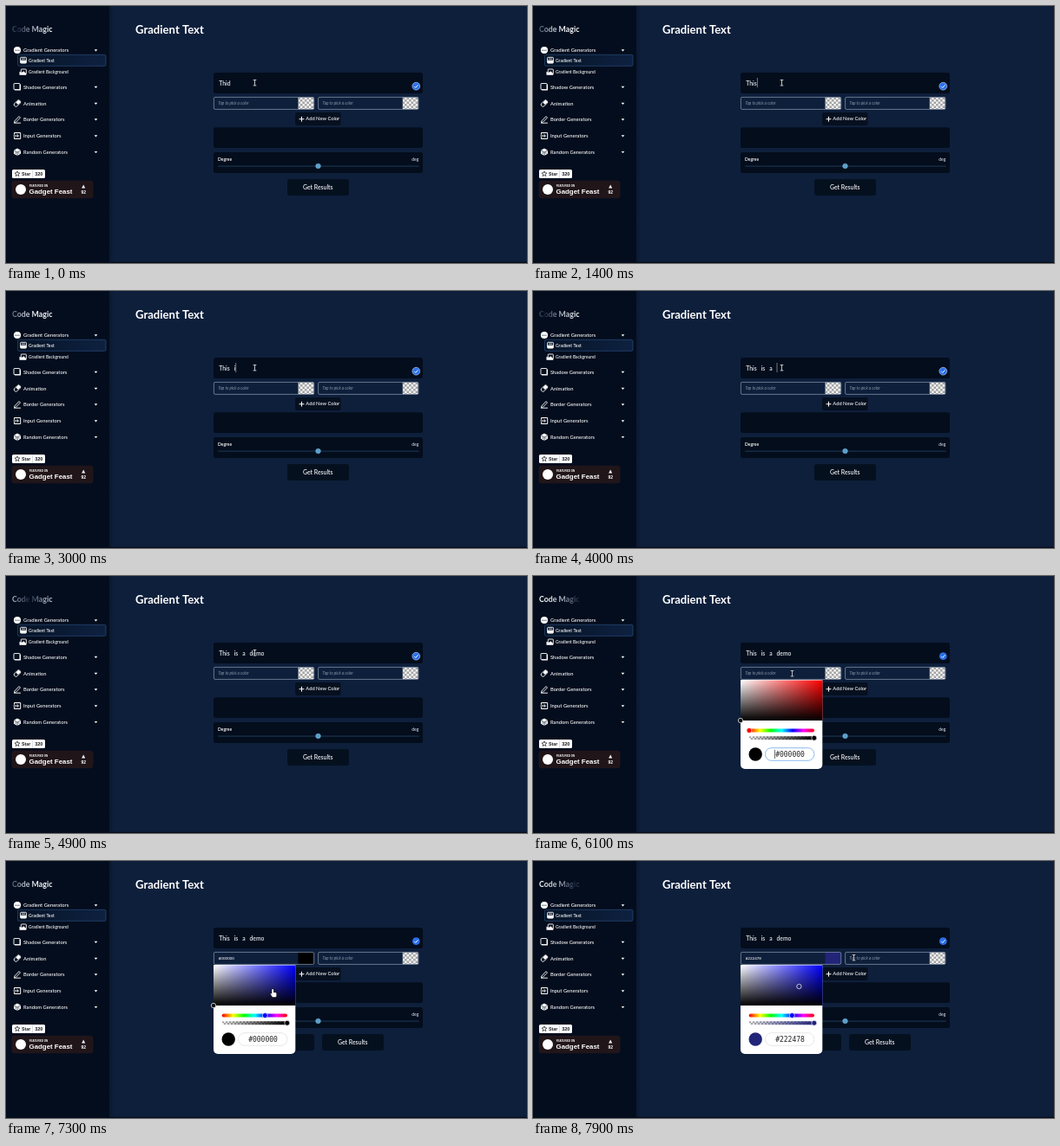
Animation of 600 by 297 pixels, one loop 8 s. Source, as an HTML page with a canvas:

```html
<!DOCTYPE html>
<html lang="en">
<head>
<meta charset="utf-8">
<title>Gradient Text</title>
<style>
html, body { margin: 0; width: 100%; height: 100%; overflow: hidden; background: #0e1f3b; }
canvas { display: block; width: 600px; height: 297px; }
</style>
</head>
<body>
<canvas id="stage"></canvas>
<script>
const W = 600, H = 297, LOOP = 8000, STEP = 100;
const canvas = document.getElementById('stage');
const c = canvas.getContext('2d');
const ratio = window.devicePixelRatio || 1;
canvas.width = W * ratio;
canvas.height = H * ratio;

const SANS = 'Lato, "Open Sans", sans-serif';
const ARIAL = '"Liberation Sans", Arial, sans-serif';
const MONO = '"DejaVu Sans Mono", monospace';
const WHITE = '#fff', PANEL = '#040d1c', BLUE = '#2a6fe8';

// Event times in ms
const TYPED = 4800, OPEN = 5900, HUE = 6700, PICK = 7500;

const typing = [
  [0, 'Thid'], [400, 'Thi'], [800, 'This'], [2300, 'This '], [2900, 'This i'],
  [3300, 'This is'], [3500, 'This is '], [3700, 'This is a'], [3900, 'This is a '],
  [4100, 'This is a d'], [4300, 'This is a de'], [4500, 'This is a dem'], [4700, 'This is a demo']
];
const pointer = [
  [0, 286, 89], [5300, 286, 89], [5700, 298, 113], [6200, 298, 113], [6600, 298, 179],
  [6900, 298, 179], [7300, 308, 153], [7400, 306, 146], [7600, 306, 146], [7900, 369, 112]
];
// Centre of the dark band that runs through the brand text
const shade = [[0, 13], [1400, 0], [3000, -2], [4900, 27], [6100, 53], [7300, 0], [7900, 49]];

function track(keys, t, col = 1) {
  const i = keys.findIndex(k => k[0] > t);
  if (i < 0) return keys[keys.length - 1][col];
  const a = keys[i - 1], b = keys[i];
  return a[col] + (b[col] - a[col]) * (t - a[0]) / (b[0] - a[0]);
}

function box(x, y, w, h, r, fill, line, lw = 0.7) {
  c.beginPath();
  c.roundRect(x, y, w, h, r);
  if (fill) { c.fillStyle = fill; c.fill(); }
  if (line) { c.strokeStyle = line; c.lineWidth = lw; c.stroke(); }
}

function dot(x, y, r, fill, line, lw = 0.8) {
  c.beginPath();
  c.arc(x, y, r, 0, Math.PI * 2);
  if (fill) { c.fillStyle = fill; c.fill(); }
  if (line) { c.strokeStyle = line; c.lineWidth = lw; c.stroke(); }
}

function path(pts, line, fill, lw = 1) {
  c.beginPath();
  for (let i = 0; i < pts.length; i += 2) c.lineTo(pts[i], pts[i + 1]);
  if (fill) { c.closePath(); c.fillStyle = fill; c.fill(); }
  if (line) { c.strokeStyle = line; c.lineWidth = lw; c.stroke(); }
}

function label(s, x, y, size, { weight = 500, color = WHITE, font = SANS, align = 'left', style = '' } = {}) {
  c.font = `${style} ${weight} ${size}px ${font}`;
  c.fillStyle = color;
  c.textAlign = align;
  c.fillText(s, x, y);
}

function ramp(x0, y0, x1, y1, colors) {
  const g = c.createLinearGradient(x0, y0, x1, y1);
  colors.forEach((k, i) => g.addColorStop(i / (colors.length - 1), k));
  return g;
}

function checker(x, y, w, h, s) {
  c.save();
  c.beginPath();
  c.rect(x, y, w, h);
  c.clip();
  c.fillStyle = '#f4f4f4';
  c.fillRect(x, y, w, h);
  c.fillStyle = '#a3a3a3';
  for (let j = 0; j * s < h; j++)
    for (let i = j % 2; i * s < w; i += 2) c.fillRect(x + i * s, y + j * s, s, s);
  c.restore();
}

function icon(kind, x, y) {
  c.save();
  c.translate(x, y);
  if (kind === 'globe') {
    dot(0, 0, 4.1, WHITE);
    [-2, 0, 2].forEach(i => dot(i, 0.2, 0.6, '#15233b'));
  } else if (kind === 'shadow') {
    box(-3, -3, 7, 7, 0.5, WHITE);
    box(-4, -4, 7, 7, 0.5, '#06101f', WHITE, 0.9);
  } else if (kind === 'motion') {
    c.rotate(-Math.PI / 4);
    box(-4.2, -2.1, 8.4, 4.2, 1.6, null, WHITE, 0.9);
    box(-0.5, -1.8, 4.4, 3.6, 1.2, WHITE);
  } else if (kind === 'pen') {
    path([-3.2, 2, 2, -3.5, 3.5, -2, -1.7, 3.3, -3.5, 3.5, -3.2, 2], WHITE, null, 0.9);
    path([-4, 4.2, 4, 4.2], WHITE, null, 0.9);
  } else if (kind === 'input') {
    path([-3.5, -1.3, -3.5, -3.5, 3.7, -3.5, 3.7, 3.5, -3.5, 3.5, -3.5, 1.3], WHITE);
    path([-4.5, 0, 1, 0], WHITE);
    path([-0.3, -1.7, 1.5, 0, -0.3, 1.7], WHITE);
  } else if (kind === 'dice') {
    path([0, -4.3, 4, -2, 4, 2, 0, 4.3, -4, 2, -4, -2], null, WHITE);
    path([-4, -2, 0, 0.4, 4, -2], '#0a1528', null, 0.7);
    path([0, 0.4, 0, 4.3], '#0a1528', null, 0.7);
    [-2, 2].forEach(i => dot(i, 1.2, 0.6, '#0a1528'));
  } else if (kind === 'text') {
    box(-3.4, -3.4, 6.8, 6.8, 0.8, null, WHITE, 0.9);
    box(-3.2, 0, 6.4, 3.2, 0, WHITE);
    path([-2, -1.5, 2, -1.5], WHITE, null, 0.8);
  } else if (kind === 'image') {
    box(-2.2, -3.3, 6, 5.6, 0.6, null, WHITE, 0.9);
    path([-4, 3.5, -4, -0.5, -1.5, 0.7, 0.8, -1, 3.8, 2, 3.8, 3.5], null, WHITE);
  }
  c.restore();
}

function sidebar(t) {
  c.fillStyle = ramp(119, 0, 124, 0, ['rgba(3,10,24,.3)', 'rgba(3,10,24,0)']);
  c.fillRect(119, 0, 5, H);
  c.fillStyle = '#040d1d';
  c.fillRect(0, 0, 119, H);

  const p = track(shade, t);
  label('Code Magic', 7, 30.3, 8.8, {
    weight: 700, color: ramp(p - 38, 0, p + 38, 0, ['#f4f6f9', '#a4adbc', '#17263f', '#a4adbc', '#f4f6f9'])
  });

  const menu = [
    ['globe', 'Gradient', 51], ['shadow', 'Shadow', 93.5], ['motion', '', 112.5],
    ['pen', 'Border', 131], ['input', 'Input', 150], ['dice', 'Random', 168.7]
  ];
  for (const [kind, name, y] of menu) {
    icon(kind, 13, y);
    label(name ? name + ' Generators' : 'Animation', 20, y + 2.2, 5.8);
    path([101.6, y - 0.8, 105.4, y - 0.8, 103.5, y + 1.4], null, WHITE);
  }
  box(13.5, 56.3, 101.5, 13, 1.5, ramp(13, 0, 115, 0, ['#071427', '#0d2140']), '#2f5587', 0.6);
  icon('text', 20, 62.7);
  label('Gradient Text', 26, 64.8, 5);
  icon('image', 19.5, 76.3);
  label('Gradient Background', 26, 78.3, 4.9);

  box(7, 189, 38, 10, 1.5, WHITE);
  c.fillStyle = '#c6cad0';
  c.fillRect(30, 189, 0.6, 10);
  const star = [];
  for (let i = 0; i < 11; i++) {
    const a = i * Math.PI / 5 - Math.PI / 2, r = i % 2 ? 1.4 : 3.1;
    star.push(13 + r * Math.cos(a), 194 + r * Math.sin(a));
  }
  path(star, '#15181d', null, 0.7);
  label('Star', 18, 196.2, 5.3, { weight: 700, color: '#15181d', font: ARIAL });
  label('320', 33.2, 196.2, 5.5, { weight: 700, color: '#15181d', font: ARIAL });

  box(7, 202.3, 93, 19.4, 2.5, '#201518', '#2c1d20', 0.6);
  dot(17, 212, 6, WHITE);
  label('FEATURED ON', 26.7, 208.8, 3, { weight: 700, font: ARIAL });
  label('Gadget Feast', 26.5, 217, 7.9, { weight: 700, font: ARIAL });
  path([87.2, 210.5, 91.2, 210.5, 89.2, 206.5], null, WHITE);
  label('92', 89.2, 217, 5, { weight: 700, font: ARIAL, align: 'center' });
}

function colorField(x, value) {
  if (value) {
    c.fillStyle = value;
    c.fillRect(x + 97, 105.5, 18, 13.8);
    label(value, x + 5.3, 114.3, 4.5);
  } else {
    checker(x + 97, 105.5, 18, 13.8, 2.5);
    label('Tap to pick a color', x + 5, 114.2, 4.7, { weight: 400, style: 'italic', color: '#8a97ab' });
  }
  box(x, 105.4, 115.3, 14, 1.5, null, '#a3b3c7', 0.6);
}

function form(t, color) {
  label('Gradient Text', 149, 32.4, 13.1, { weight: 700 });

  box(239, 77, 241, 24, 2.5, PANEL);
  const text = typing.filter(k => k[0] <= t).pop()[1];
  c.wordSpacing = '3.2px';
  label(text, 245.3, 91.8, 6.8, { weight: 600, color: '#e6e9ee' });
  const end = 245.3 + c.measureText(text).width;
  c.wordSpacing = '0px';
  if (t > 0 && t < TYPED) {
    c.fillStyle = '#b9c1cc';
    c.fillRect(end + 0.2, 83, 0.6, 11);
  }
  dot(472.3, 92.7, 4.4, BLUE, t < OPEN ? '#c9dcff' : null, 0.6);
  path([470.2, 92.9, 471.7, 94.4, 474.6, 91.2], WHITE, null, 0.9);

  colorField(239.4, color);
  colorField(359.6, null);

  box(333, 123, 52.5, 15, 2, '#06101f');
  path([337.6, 130.7, 343.4, 130.7], WHITE);
  path([340.5, 127.8, 340.5, 133.6], WHITE);
  label('Add New Color', 345.3, 132.4, 5.75);

  box(239, 140.3, 241, 23.7, 2.5, PANEL);
  box(239, 169, 241, 24, 2.5, PANEL);
  label('Degree', 244, 178.5, 5, { weight: 600 });
  label('deg', 475.3, 178.5, 5, { align: 'right', color: '#d5dbe4' });
  box(244, 184.2, 232, 1.8, 0.9, '#12283f');
  dot(359.5, 185, 2.8, '#5a9fcb', '#82bcdf', 0.5);

  if (color) box(284, 200, 71, 19, 2.5, '#05101f');
  const x = color ? 364 : 324;
  box(x, 200, 71, 19, 2.5, '#05101f');
  label('Get Results', x + 35.3, 212, 6.9, { align: 'center' });
}

function picker(t, color) {
  const picked = t >= PICK, hue = t >= HUE ? 240 : 0;
  const pure = `hsl(${hue} 100% 50%)`, shown = color || '#000000';
  box(239, 120, 94.3, 103, [0, 0, 5, 5], WHITE);
  for (const g of [ramp(239, 0, 333, 0, [WHITE, pure]), ramp(0, 120.5, 0, 167, ['rgba(0,0,0,0)', '#000'])]) {
    c.fillStyle = g;
    c.fillRect(239, 120.5, 94.3, 46.5);
  }
  dot(picked ? 306.4 : 239, picked ? 145 : 167, 2.7, shown, '#e8e8e8', 0.8);

  const rainbow = [0, 60, 120, 180, 240, 300, 360].map(h => `hsl(${h} 100% 50%)`);
  box(248.7, 176.5, 75.3, 4, 2, ramp(249, 0, 324, 0, rainbow));
  dot(249 + 75 * hue / 360 - (hue ? 0.7 : 0), 178.5, 3, pure, WHITE, 0.7);
  checker(249, 185.2, 75, 4, 2);
  box(248.7, 185.2, 75.3, 4, 2, ramp(249, 0, 324, 0, [shown + '00', shown]));
  dot(323.8, 187.2, 3, shown, WHITE, 0.7);

  dot(256.2, 206, 7.7, shown);
  const focus = t < HUE;
  box(267.5, 198.7, 56.3, 14.6, 7, WHITE, focus ? '#8dbcf0' : '#dcdcdc', focus ? 1 : 0.7);
  label(shown, 296, 209.2, 8, { font: MONO, weight: 400, align: 'center', color: '#222' });
  if (focus) {
    c.fillStyle = '#333';
    c.fillRect(278, 200.8, 0.7, 10.4);
  }
}

function cursor(t) {
  const x = track(pointer, t), y = track(pointer, t, 2);
  c.save();
  c.translate(x, y);
  if (t >= OPEN && x < 333 && y > 120) {
    c.beginPath();
    c.roundRect(-1.8, -5, 1.9, 7, 0.9);
    c.roundRect(-1.8, -1, 5.2, 5.3, 1.4);
    c.moveTo(-1.8, 0.8);
    c.lineTo(-3.8, -0.2);
    c.lineTo(-1.5, 4);
    c.strokeStyle = '#111';
    c.lineWidth = 1.2;
    c.stroke();
    c.fillStyle = WHITE;
    c.fill();
  } else {
    for (const [color, lw] of [['#0a1220', 1.8], ['#e9edf2', 0.8]]) {
      path([0.5, -3.4, 0.5, 2.8], color, null, lw);
      path([-1.3, -3.5, 2.3, -3.5], color, null, lw);
      path([-1.3, 2.9, 2.3, 2.9], color, null, lw);
    }
  }
  c.restore();
}

function draw(t) {
  const color = t >= PICK ? '#222478' : t >= HUE ? '#000000' : null;
  c.setTransform(ratio, 0, 0, ratio, 0, 0);
  c.fillStyle = '#0e1f3b';
  c.fillRect(0, 0, W, H);
  c.fillStyle = '#050d1b';
  c.fillRect(119, 295.8, W - 119, 1.2);
  sidebar(t);
  form(t, color);
  if (t >= OPEN) picker(t, color);
  cursor(t);
}

const start = performance.now();
function frame() {
  const t = (performance.now() - start) % LOOP;
  draw(Math.floor(t / STEP) * STEP);
  requestAnimationFrame(frame);
}
frame();
</script>
</body>
</html>
```
